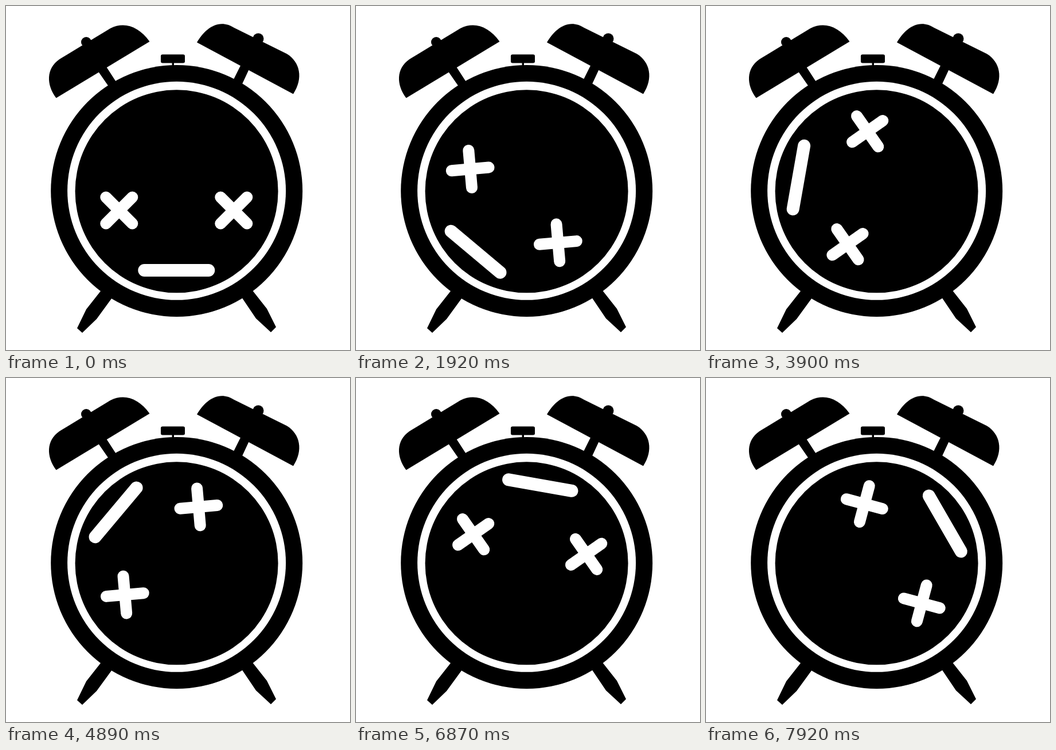
An HTML page with a canvas for the animation above (8 s loop, 600 by 600 pixels).

```html
<!DOCTYPE html>
<html lang="en">
<head>
<meta charset="utf-8">
<title>Alarm clock</title>
<style>
html, body { margin: 0; width: 100%; height: 100%; overflow: hidden; background: #fff; }
canvas { display: block; }
</style>
</head>
<body>
<canvas id="stage" width="600" height="600"></canvas>
<script>
const ctx = document.getElementById('stage').getContext('2d');
const LOOP = 8000, BEAT = 990, REST = 930, TICK = 30;
const CENTER = { x: 297.3, y: 323 };

const body = new Path2D([
  // bells
  'M87.5 160.5 C70 137 70 109 93 93 L182 39 C206 27 231 35 250.5 62Z',
  'M333 63.5 C346 41 370 20 398 38 L490 83.5 C513 98 519 126 501 153.5Z',
  // bell stems
  'M161.5 115 L175 106 L192.5 133 L179.5 141Z',
  'M410.5 101 L425 108 L411.5 137 L396 130Z',
  // legs
  'M166 496 L185 509 L158 546 L133 570 L124 562 L140 529Z',
  'M429 495 L411 508 L436 545 L462 569 L471 560 L455 528Z',
  // button stem
  'M289.5 98 H293 V106 H289.5Z'
].join(' '));

function disc(x, y, r, color) {
  ctx.fillStyle = color;
  ctx.beginPath();
  ctx.arc(x, y, r, 0, 2 * Math.PI);
  ctx.fill();
}

function bar(x1, y1, x2, y2, width) {
  ctx.lineWidth = width;
  ctx.beginPath();
  ctx.moveTo(x1, y1);
  ctx.lineTo(x2, y2);
  ctx.stroke();
}

function cross(x, y, arm) {
  bar(x - arm, y - arm, x + arm, y + arm, 20);
  bar(x - arm, y + arm, x + arm, y - arm, 20);
}

function drawClock() {
  ctx.fillStyle = '#fff';
  ctx.fillRect(0, 0, 600, 600);
  ctx.fillStyle = '#000';
  ctx.fill(body);
  ctx.beginPath();
  ctx.roundRect(270, 84.5, 42, 15, 3);
  ctx.fill();
  disc(140, 63, 9, '#000');
  disc(440, 57, 9.5, '#000');
  disc(297.7, 322.5, 219.5, '#000');
  disc(297.6, 322.3, 190.5, '#fff');
  disc(297.6, 323.3, 177, '#000');
}

function drawFace(angle) {
  ctx.save();
  ctx.translate(CENTER.x, CENTER.y);
  ctx.rotate(angle * Math.PI / 180);
  ctx.strokeStyle = '#fff';
  ctx.lineCap = 'round';
  cross(-100, 33.5, 23);
  cross(100, 33.5, 23);
  bar(-56, 138, 56, 138, 22);
  ctx.restore();
}

// Rests, then turns 30 degrees in three quick ticks.
function faceAngle(time) {
  const beat = Math.floor(time / BEAT);
  const late = time - beat * BEAT - REST;
  const ticks = late < 0 ? 0 : Math.floor(late / TICK) + 1;
  return beat * 30 + ticks * 10;
}

const start = performance.now();
function frame() {
  drawClock();
  drawFace(faceAngle((performance.now() - start) % LOOP));
  requestAnimationFrame(frame);
}
frame();
</script>
</body>
</html>
```
